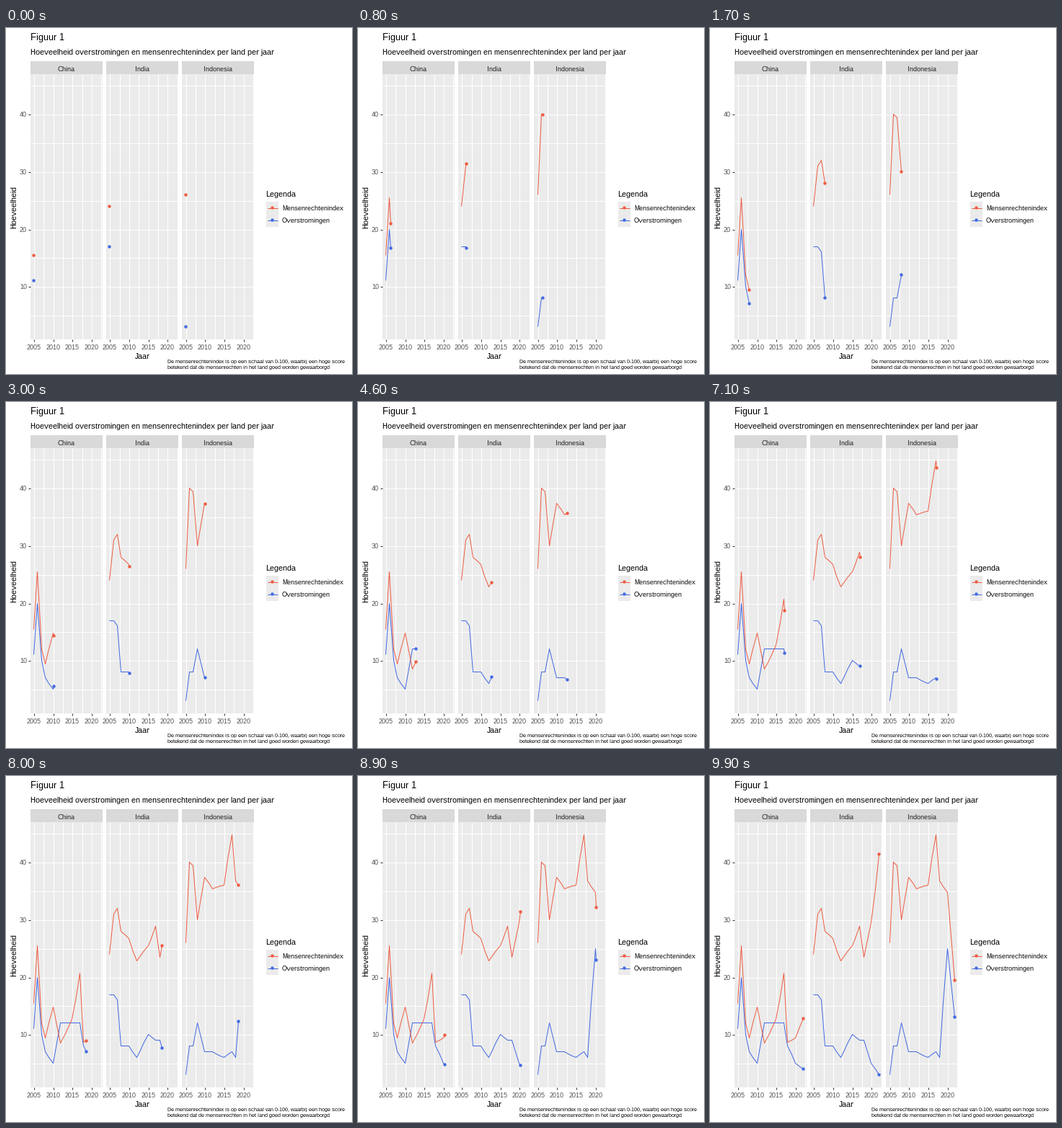
A matplotlib script for the animation above (10 s loop, 480 by 480 pixels).

```python
import numpy as np
import matplotlib.pyplot as plt
from matplotlib.animation import FuncAnimation
from matplotlib.patches import Circle, Rectangle

SIZE, DPI = 480, 96
PX = 72 / DPI
FRAMES, INTERVAL = 100, 100
FIRST, LAST = 2005, 2022

RED, BLUE = "#EE5C42", "#4169E1"
GREY, STRIP, TICK = "#EBEBEB", "#D9D9D9", "#333333"
TOP, BOTTOM = 64, 432
STEP, WIDTH = 105.3, 99.8

# key years of all curves, counted from the first year
KEYS = [0, 1, 2, 3, 5, 7, 10, 12, 13, 15, 17]
# country: (index, floods) at the key years
CURVES = {
    "China": ([15.4, 25.4, 12, 9.4, 14.8, 8.6, 12.7, 20.7, 8.7, 9.4, 12.8],
              [11, 20, 10, 7, 5, 12, 12, 12, 8, 5, 4]),
    "India": ([24, 31, 32, 28, 26.7, 22.8, 25.4, 28.8, 23.4, 29.4, 41.4],
              [17, 17, 16, 8, 8, 6, 10, 9, 9, 5, 3]),
    "Indonesia": ([26, 40, 39.4, 30, 37.4, 35.4, 36, 44.8, 36.7, 34.7, 19.4],
                  [3, 8, 8, 12, 7, 7, 6, 7, 6, 25, 13]),
}

# whole-pixel glyph spacing for crisp small text
plt.rcParams.update({"font.family": "Liberation Sans",
                     "text.hinting": "native", "text.hinting_factor": 1})
fig = plt.figure(figsize=(SIZE / DPI, SIZE / DPI), dpi=DPI, facecolor="white")
ax = fig.add_axes([0, 0, 1, 1])
ax.set_xlim(0, SIZE)
ax.set_ylim(SIZE, 0)
ax.axis("off")


def snap(v):
    """Move a coordinate to the centre of its pixel."""
    return np.floor(v) + 0.5


def x_pos(left, year):
    return snap(left + 4.6 + 5.337 * (np.asarray(year) - FIRST))


def y_pos(value):
    return snap(414.8 - 7.985 * (np.asarray(value) - 3))


def box(x0, y0, x1, y1, color, z=0):
    ax.add_patch(Rectangle((x0, y0), x1 - x0, y1 - y0, fc=color, lw=0, zorder=z))


def line(xs, ys, color, z=1):
    return ax.plot(xs, ys, color=color, lw=PX, zorder=z,
                   solid_capstyle="butt", solid_joinstyle="round")[0]


def dot(x, y, color, z=5):
    return ax.add_patch(Circle((x, y), 2.2, fc=color, lw=0, zorder=z))


def label(x, y, text, size, color="black", ha="left", va="baseline", **kw):
    ax.text(x, y, text, size=size * PX, color=color, ha=ha, va=va, **kw)


def draw_panel(name, left):
    x0, x1 = round(left), round(left + WIDTH)
    box(x0, 46, x1, TOP, STRIP)
    box(x0, TOP, x1, BOTTOM, GREY)
    label((x0 + x1) / 2, 60, name, 9, "#1A1A1A", "center")
    for value in range(5, 50, 5):
        y = y_pos(value)
        line([x0, x1], [y, y], "white")
    for year in np.arange(FIRST, LAST + 1, 2.5):
        x = x_pos(left, year)
        line([x, x], [TOP, BOTTOM], "white")
        if year % 5 == 0:
            line([x, x], [BOTTOM, BOTTOM + 3], TICK)
            label(x, 446, f"{year:.0f}", 9, "#4D4D4D", "center")


def draw_legend():
    label(360, 234, "Legenda", 11)
    box(361, 241, 378, 276, GREY)
    for name, color, y in (("Mensenrechtenindex", RED, 249.5),
                           ("Overstromingen", BLUE, 266.5)):
        line([363, 377], [y, y], color, 3)
        dot(369.5, y, color)
        label(383, y + 3.5, name, 9)


def draw_texts():
    label(34, 17, "Figuur 1", 13)
    label(34, 37, "Hoeveelheid overstromingen en mensenrechtenindex "
                  "per land per jaar", 11)
    label(189.5, 459, "Jaar", 11, ha="center")
    label(16, 248, "Hoeveelheid", 11, ha="right", va="center", rotation=90)
    label(224, 465, "De mensenrechtenindex is op een schaal van 0-100, "
                    "waarbij een hoge score", 7)
    label(224, 473, "betekend dat de mensenrechten in het land goed "
                    "worden gewaarborgd", 7)
    box(0, 474, SIZE, SIZE, "white", 9)
    for value in range(10, 50, 10):
        y = y_pos(value)
        line([31, 34], [y, y], TICK)
        label(29, y + 3.5, str(value), 9, "#4D4D4D", "right")


years = np.arange(FIRST, LAST + 1)
# each year is reached on a whole frame
arrival = np.round((years - FIRST) * (FRAMES - 1) / (LAST - FIRST))

series = []
for i, (name, (index, floods)) in enumerate(CURVES.items()):
    left = 33.9 + STEP * i
    draw_panel(name, left)
    for points, color, z in ((floods, BLUE, 3), (index, RED, 4)):
        values = np.interp(years - FIRST, KEYS, points)
        series.append((left, values, line([], [], color, z),
                       dot(0, 0, color, z + 2)))
draw_legend()
draw_texts()


def update(frame):
    past = arrival < frame
    now = np.interp(frame, arrival, years)
    for left, values, path, head in series:
        xs = x_pos(left, np.append(years[past], now))
        ys = y_pos(np.append(values[past], np.interp(frame, arrival, values)))
        path.set_data(xs, ys)
        head.set_center((xs[-1], ys[-1]))
    return []


anim = FuncAnimation(fig, update, frames=FRAMES, interval=INTERVAL,
                     repeat=True, repeat_delay=0, blit=False)
plt.show()
```
